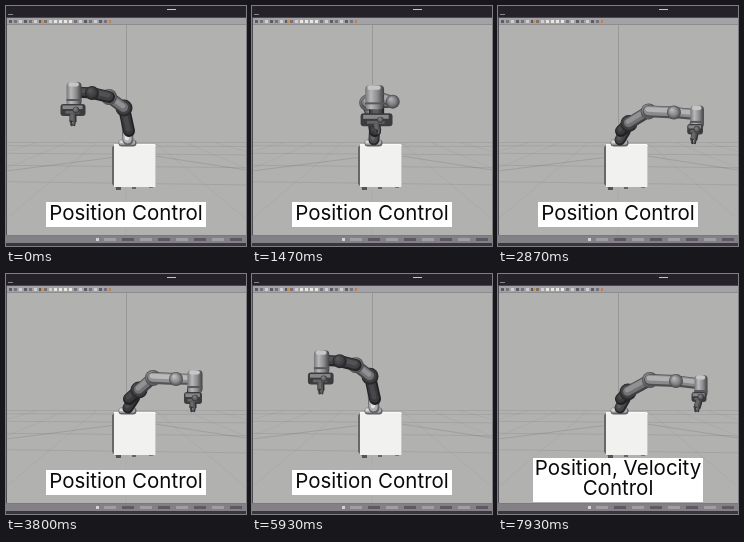
Recreate the animation shown at these times as an HTML page with a canvas. Size 240x240 px, loop 8 s.

```html
<!DOCTYPE html>
<html lang="en">
<head>
<meta charset="utf-8">
<title>Robot arm control</title>
<style>
html, body { margin: 0; width: 100%; height: 100%; overflow: hidden; background: #b1b1b0; }
canvas { display: block; width: 100vw; height: 100vh; }
</style>
</head>
<body>
<canvas id="stage" width="240" height="240"></canvas>
<script>
const ctx = document.getElementById('stage').getContext('2d');
const LOOP = 8000, FPS = 15, CUT = 7000;
const PERIOD = 6480, RIGHTMOST = 3180, RIGHTMOST_AGAIN = 7930;

// Poses along the swing, from -1 (left) to 1 (right):
// shoulder xy, elbow xy, forearm xy, wrist x/top/bottom/width,
// flange x/y/width/height, gripper tip xy, base lightness
const poses = [
  [-.94, [118, 102, 103, 91, 86, 87, 68, 76, 96, 15, 67, 104, 25, 12, 67, 120, 1]],
  [-.62, [118, 104, 108, 92, 97, 88, 79, 77, 97, 17, 79, 108, 29, 12, 81, 122, .85]],
  [0, [122, 113, 117, 98, 145, 97, 131, 80, 100, 19, 133, 115, 32, 13, 134, 130, .1]],
  [.41, [126, 111, 137, 106, 153, 102, 171, 90, 109, 18, 171, 122, 29, 12, 170, 136, 0]],
  [.825, [133, 116, 147, 104, 170, 105, 189, 96, 115, 15, 187, 124, 18, 12, 187, 138, 0]],
  [1, [130, 118, 152, 106, 178, 107, 203, 101, 119, 13, 201, 123, 15, 10, 199, 138, .1]]
];

// Smooth interpolation that never overshoots a turning point
function poseAt(yaw) {
  const last = poses.length - 1;
  let i = 0;
  while (i < last - 1 && yaw >= poses[i + 1][0]) i++;
  const [x0, a] = poses[i], [x1, b] = poses[i + 1];
  const h = x1 - x0, u = Math.max(0, Math.min(1, (yaw - x0) / h));
  const slope = (k, c) => (poses[k + 1][1][c] - poses[k][1][c]) / (poses[k + 1][0] - poses[k][0]);
  const tangent = (k, c) => {
    if (k === 0) return slope(0, c);
    if (k === last) return slope(last - 1, c);
    const p = slope(k - 1, c), q = slope(k, c);
    return p * q <= 0 ? 0 : 2 * p * q / (p + q);
  };
  const u2 = u * u, u3 = u2 * u;
  return a.map((v, c) =>
    v * (2 * u3 - 3 * u2 + 1) + b[c] * (3 * u2 - 2 * u3) +
    h * (tangent(i, c) * (u3 - 2 * u2 + u) + tangent(i + 1, c) * (u3 - u2)));
}

function yawAt(t) {
  const peak = t < CUT ? RIGHTMOST : RIGHTMOST_AGAIN;
  return Math.cos(2 * Math.PI * (t - peak) / PERIOD);
}

function rect(x, y, w, h, color) {
  ctx.fillStyle = color;
  ctx.fillRect(x, y, w, h);
}

function line(x1, y1, x2, y2, w, color) {
  ctx.strokeStyle = color;
  ctx.lineWidth = w;
  ctx.beginPath();
  ctx.moveTo(x1, y1);
  ctx.lineTo(x2, y2);
  ctx.stroke();
}

function block(x, y, w, h, r, color) {
  ctx.fillStyle = color;
  ctx.beginPath();
  ctx.roundRect(x, y, w, h, r);
  ctx.fill();
}

const gray = v => { v = Math.round(v); return `rgb(${v},${v},${v + 2})`; };

function limb(x1, y1, x2, y2, w, tone, cap = 'round') {
  ctx.lineCap = cap;
  line(x1, y1, x2, y2, w, gray(tone * .45));
  line(x1 - .5, y1 - .8, x2 - .5, y2 - .8, w * .76, gray(tone * .78));
  line(x1 - 1, y1 - w * .16, x2 - 1, y2 - w * .16, w * .4, gray(tone));
  ctx.lineCap = 'butt';
}

function ball(x, y, r, tone) {
  const g = ctx.createRadialGradient(x - r * .3, y - r * .4, r * .1, x, y, r);
  g.addColorStop(0, gray(tone));
  g.addColorStop(.6, gray(tone * .72));
  g.addColorStop(1, gray(tone * .38));
  ctx.fillStyle = g;
  ctx.beginPath();
  ctx.arc(x, y, r, 0, 7);
  ctx.fill();
}

function cylinder(x, top, bottom, w) {
  const g = ctx.createLinearGradient(x - w / 2, 0, x + w / 2, 0);
  g.addColorStop(0, '#77777a');
  g.addColorStop(.3, '#b9b9ba');
  g.addColorStop(.65, '#8b8b8d');
  g.addColorStop(1, '#404042');
  block(x - w / 2, top, w, bottom - top + 4, 4, g);
  block(x - w * .38, top + .5, w * .7, 4, 2, '#c6c6c7');
  rect(x - w / 2, bottom - 3, w, 2, '#59595b');
}

function drawScene() {
  rect(0, 0, 240, 240, '#b1b1b0');
  for (let i = 0; i < 5; i++) {
    const y = 136.5 + i * i * 2.2 + i;
    line(0, y, 240, y + i * .8, .7, 'rgba(110,112,110,.3)');
  }
  for (let i = -3; i <= 3; i++) {
    line(120 + i * 30, 137, 120 + i * 140, 230, .6, 'rgba(110,112,110,.18)');
  }
  line(0, 165, 110, 151, .7, 'rgba(100,100,100,.35)');
  line(149, 150, 240, 164, .7, 'rgba(100,100,100,.35)');
  line(120.5, 18, 120.5, 138, .8, '#92928f');

  rect(0, 0, 240, 11, '#25222a');
  rect(161, 3, 9, 1, '#c9c7cc');
  rect(2, 8, 5, 1, '#88858b');
  rect(0, 11, 240, 7, '#a3a2a7');
  rect(0, 11, 240, 1, '#4b484e');
  rect(0, 18, 240, 1, '#8d8c8e');
  for (let i = 0; i < 20; i++) {
    const color = i > 8 && i < 13 ? '#e8e6df' : ['#5d5c66', '#777277', '#d0ced1'][i % 3];
    rect(3 + i * 5, 14, 3, 3, color);
  }
  rect(35, 14, 2, 3, '#c89152');
  rect(103, 14, 2, 3, '#bd8150');

  rect(0, 12, 1, 228, '#514d57');
  rect(0, 229, 240, 1, '#7b787e');
  rect(0, 230, 240, 7, '#838086');
  rect(0, 237, 240, 3, '#3a363f');
  rect(90, 232, 3, 3, '#d4d2d6');
  for (let i = 0; i < 8; i++) {
    rect(98 + i * 18, 232, 12, 3, i % 2 ? '#5d5863' : '#a09da4');
  }
}

function drawBox() {
  rect(110, 180, 5, 4, '#545456');
  rect(126, 180, 4, 3, '#666');
  rect(143, 180, 4, 2, '#777');
  ctx.fillStyle = '#68686a';
  ctx.beginPath();
  ctx.moveTo(106, 141);
  ctx.lineTo(110, 138);
  ctx.lineTo(110, 182);
  ctx.lineTo(106, 178);
  ctx.fill();
  rect(108, 139, 42, 42, '#f1f1ef');
  rect(108, 138, 41, 1, '#fafaf8');
  rect(149, 140, 1, 41, '#c8c8c6');
}

function drawArm(p) {
  const [sx, sy, ex, ey, fx, fy, wx, wt, wb, ww, px, py, pw, ph, gx, gy, light] = p;
  const base = 76 + 150 * light;
  const fore = 186 - 105 * light;

  // Pedestal and upright link
  limb(116, 137, 127, 137, 7, 215);
  limb(122, 134, (122 + sx) / 2 + 1, (132 + sy) / 2, 11, base);
  limb(123, 125, sx, sy, 12, 72);
  ball(sx, sy, 8.5, 92);

  // Upper arm and forearm
  limb(sx, sy, ex, ey, 12, 145);
  ball(ex, ey, 8, 188);
  limb(ex, ey, fx, fy, 12, fore);
  limb(fx, fy, wx, (wt + wb) / 2, 11, fore);
  ball(fx, fy, 7, fore + 5);

  // Wrist, flange and gripper
  limb(px, wb, px, py, ww * .8, 92);
  cylinder(wx, wt, wb, ww);
  block(px - pw / 2, py - ph / 2, pw, ph, 3, '#3c3c3e');
  rect(px - pw * .42, py - ph * .38, pw * .8, ph * .3, '#88888a');
  rect(px - pw * .3, py + ph * .08, pw * .55, ph * .22, '#646467');
  ball(px + pw * .12, py, 3.2, 130);
  limb(px, py + ph * .4, gx, gy - 4, 7, 105, 'butt');
  limb(gx - 2, gy - 5, gx - 1, gy, 2, 80, 'butt');
  limb(gx + 2, gy - 5, gx + 1, gy, 2, 105, 'butt');
}

function drawLabel(lines, x, y, w, h, baseline) {
  rect(x, y, w, h, '#fff');
  ctx.fillStyle = '#0b0b0b';
  ctx.font = '400 20.5px Inter, sans-serif';
  ctx.textAlign = 'center';
  lines.forEach((text, i) => ctx.fillText(text, 120, baseline + i * 20));
}

function draw(t) {
  drawScene();
  drawBox();
  drawArm(poseAt(yawAt(t)));
  if (t < CUT) drawLabel(['Position Control'], 40, 196, 160, 25, 214);
  else drawLabel(['Position, Velocity', 'Control'], 35, 184, 170, 44, 201);
}

function tick() {
  const t = performance.now() % LOOP;
  draw(Math.floor((t + 4) * FPS / 1000) * 1000 / FPS % LOOP);
  requestAnimationFrame(tick);
}
tick();
</script>
</body>
</html>
```
